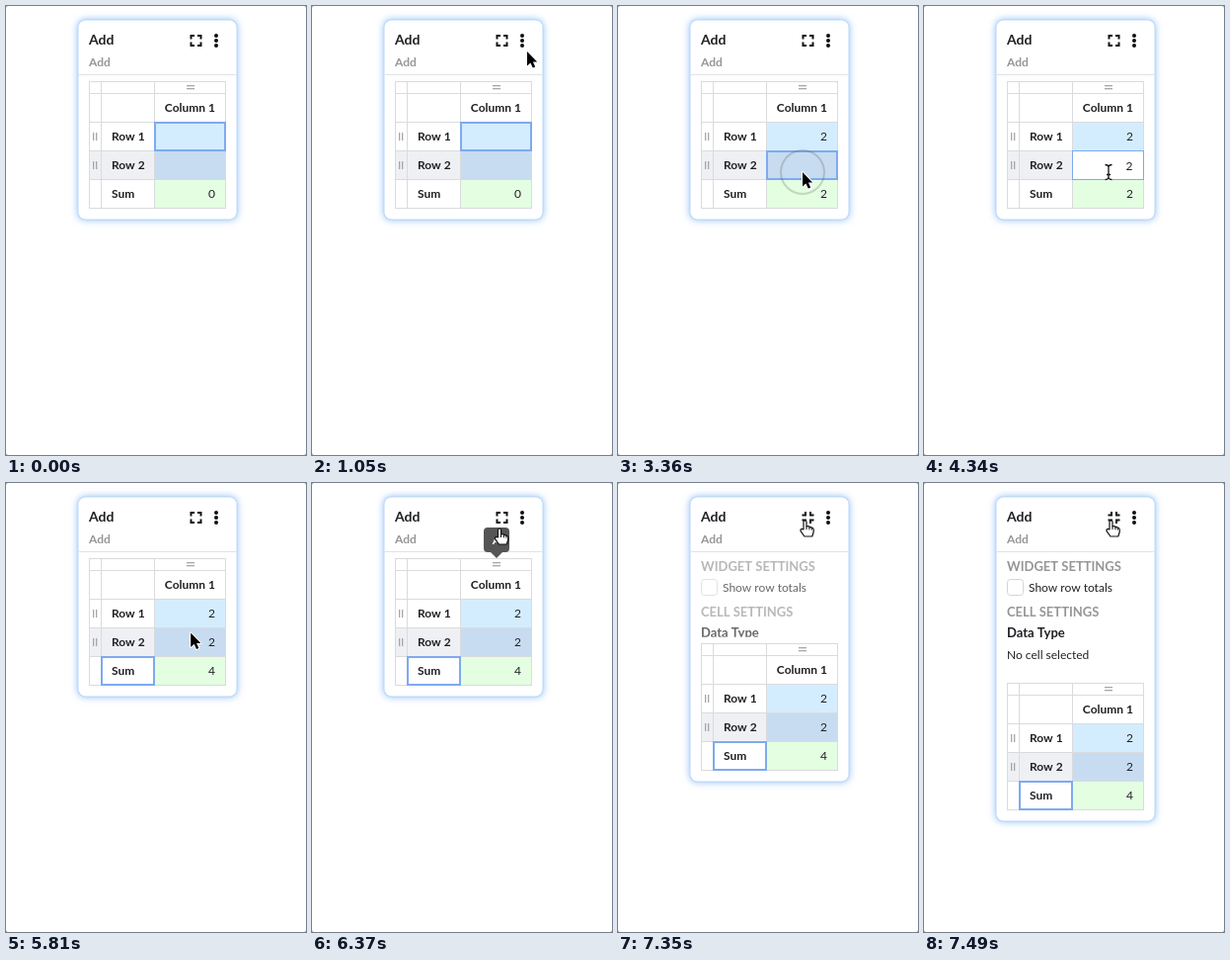
Recreate the animation shown at these times as an HTML page with a canvas. Size 304 by 454 pixels, loop 8000 ms.

```html
<!DOCTYPE html>
<html lang="en">
<head>
<meta charset="utf-8">
<title>Sum table</title>
<style>
  html, body { margin: 0; width: 100%; height: 100%; overflow: hidden; background: #8a8a8a; }
  canvas { display: block; width: 304px; height: 454px; }
</style>
</head>
<body>
<canvas width="304" height="454"></canvas>
<script>
const canvas = document.querySelector('canvas');
const ctx = canvas.getContext('2d');
const LOOP = 8000, TICK = 70;
const BLUE = '#7eaaf0', GRID = '#d9dbdd', INK = '#202124', MUTED = '#969696';

const ratio = window.devicePixelRatio || 1;
canvas.width = 304 * ratio;
canvas.height = 454 * ratio;

const clamp01 = v => Math.min(1, Math.max(0, v));
const progress = (t, from, to) => clamp01((t - from) / (to - from));
const within = (t, from, to) => t >= from && t < to;
const easeInOut = p => p < .5 ? 2 * p * p : 1 - 2 * (1 - p) ** 2;

function rect(x, y, w, h, color) {
  ctx.fillStyle = color;
  ctx.fillRect(x, y, w, h);
}

function frame(x, y, w, h, width, color) {
  ctx.strokeStyle = color;
  ctx.lineWidth = width;
  ctx.strokeRect(x + width / 2, y + width / 2, w - width, h - width);
}

function round(x, y, w, h, r, color) {
  ctx.fillStyle = color;
  ctx.beginPath();
  ctx.roundRect(x, y, w, h, r);
  ctx.fill();
}

function text(str, x, y, { size = 12, weight = 400, color = INK, align = 'left' } = {}) {
  ctx.font = `${weight} ${size}px Lato, sans-serif`;
  ctx.fillStyle = color;
  ctx.textAlign = align;
  ctx.fillText(str, x, y);
}

function drawCard(bottom) {
  ctx.save();
  ctx.shadowColor = 'rgba(110, 170, 245, .75)';
  ctx.shadowBlur = 7 * ratio;
  round(72.5, 13.5, 162, bottom - 13.5, 8, '#b9d8fb');
  ctx.restore();
  round(73.5, 14.5, 160, bottom - 15.5, 7, '#fff');
}

function drawHeader(expanded) {
  text('Add', 84, 39, { size: 14, weight: 700 });
  text('Add', 84, 61, { weight: 700, color: MUTED });
  rect(73.5, 69, 160, 1, '#dfe4ea');
  for (const y of [30, 35, 40]) round(211, y - 2, 4, 4, 2, '#111');

  // Four corner brackets, turned inwards when the card is expanded
  ctx.strokeStyle = '#111';
  ctx.lineWidth = 2;
  ctx.beginPath();
  for (const sx of [-1, 1]) for (const sy of [-1, 1]) {
    const corner = expanded ? 2.5 : 5, end = expanded ? 6 : 1.5;
    ctx.moveTo(192.5 + sx * corner, 35 + sy * end);
    ctx.lineTo(192.5 + sx * corner, 35 + sy * corner);
    ctx.lineTo(192.5 + sx * end, 35 + sy * corner);
  }
  ctx.stroke();
}

function drawSettings(p) {
  ctx.save();
  ctx.beginPath();
  ctx.rect(74, 70, 159, 126 * p);
  ctx.clip();
  ctx.globalAlpha = p;
  const heading = { size: 13, weight: 700, color: MUTED };
  text('WIDGET SETTINGS', 84, 89, heading);
  ctx.strokeStyle = '#d2d4d6';
  ctx.lineWidth = 1;
  ctx.beginPath();
  ctx.roundRect(84.5, 97.5, 16, 16, 3);
  ctx.stroke();
  text('Show row totals', 106, 110);
  text('CELL SETTINGS', 84, 135, heading);
  text('Data Type', 84, 156, { size: 13, weight: 700 });
  text('No cell selected', 84, 178);
  ctx.restore();
}

function drawEditor(y, typedAt, t) {
  rect(151, y, 71, 29, '#fff');
  frame(150, y - 1, 73, 30, 1, BLUE);
  text('2', 211.5, y + 19, { align: 'right' });
  if (t < typedAt + 490) rect(211, y + 7, 1, 15, '#111');
}

function drawTable(t) {
  const right = { align: 'right' }, bold = { weight: 700 };
  rect(84, 146, 66, 29, '#eff0f4');
  rect(150, 117, 72, 29, '#d4edfe');
  rect(150, 146, 72, 29, '#c7dcf0');
  rect(150, 175, 72, 29, '#e4fee2');
  for (const x of [84, 96, 150, 222]) rect(x, 76, 1, 129, GRID);
  for (const y of [76, 88, 117, 146, 175, 204]) rect(84, y, 139, 1, GRID);
  rect(150, 118, 72, 86, 'rgba(255, 255, 255, 0)');

  for (const y of [80, 83]) rect(183, y, 8, 1.3, '#a5a7a9');
  for (const y of [128, 157]) for (const x of [88, 91]) rect(x, y, 1.3, 8, '#a5a7a9');

  text('Column 1', 212, 107, { ...bold, ...right });
  ['Row 1', 'Row 2', 'Sum'].forEach((label, i) => text(label, 107, 136 + 29 * i, bold));

  if (t >= 3290) text('2', 212, 136, right);
  if (t >= 4620) text('2', 212, 165, right);
  text(t < 3360 ? '0' : t < 4690 ? '2' : '4', 212, 194, right);

  if (t < 2660) frame(150, 117, 73, 30, 2, BLUE);
  else if (t < 3290) drawEditor(118, 2660, t);
  else if (t < 3850) frame(150, 146, 73, 30, 2, BLUE);
  else if (t < 4620) drawEditor(147, 3850, t);
  else frame(96, 175, 55, 30, 2, BLUE);
}

function drawTooltip(t) {
  ctx.save();
  ctx.globalAlpha = progress(t, 6090, 6300) * (1 - progress(t, 6510, 6720));
  round(174, 45, 26, 25, 4, '#555');
  ctx.beginPath();
  ctx.moveTo(181, 70);
  ctx.lineTo(193, 70);
  ctx.lineTo(187, 76);
  ctx.fill();
  text('A', 187, 62, { weight: 700, color: '#fff', align: 'center' });
  ctx.restore();
}

// [time, x, y] points of the pointer's way
const WAY = [
  [1540, 179, 133], [2660, 180, 133], [2800, 180, 133], [3150, 187, 168],
  [5740, 187, 168], [6090, 188, 85], [6370, 190, 46], [6650, 189.5, 38], [LOOP, 189.5, 38]
];

function pointerAt(t) {
  if (t < 1540) {
    const p = easeInOut(progress(t, 1050, 1540));
    return [218 - 39 * p, 46 + 87 * p];
  }
  const i = WAY.findIndex(point => t < point[0]);
  const [t0, x0, y0] = WAY[i - 1], [t1, x1, y1] = WAY[i];
  const p = progress(t, t0, t1);
  return [x0 + (x1 - x0) * p, y0 + (y1 - y0) * p];
}

const ARROW = new Path2D('M0 0V14.5L3.4 11.4L5.8 16.6L8.2 15.5L5.9 10.5H10.2Z');
const HAND = new Path2D('M-1.5 9V1.3Q-1.4 0 0 0T1.5 1.3V6Q3.8 5 4.4 6.6Q6 5.8 6.8 7.4Q8.5 7 8.7 9V11.5L7.3 16H-.6L-4.4 10.6Q-5 8.8-3.2 8.4Z');
const FINGERS = new Path2D('M1.5 6V9M4.4 6.6V9.3M6.8 7.4V9.6');
const BEAM = new Path2D('M-3.5-7.5Q0-7.5 0-5V5Q0 7.5 3.5 7.5M3.5-7.5Q0-7.5 0-5V5Q0 7.5-3.5 7.5M-2 2.5H2');

function drawPointer(t) {
  if (t < 1050) return;
  const [x, y] = pointerAt(t);
  const editing = within(t, 2660, 3290) && y < 146 || within(t, 3850, 4620);
  const outline = (path, width, color) => {
    ctx.lineWidth = width;
    ctx.strokeStyle = color;
    ctx.stroke(path);
  };
  ctx.save();
  ctx.translate(x, y);
  ctx.lineJoin = 'round';
  if (editing) {
    outline(BEAM, 3, '#fff');
    outline(BEAM, 1.3, '#111');
  } else if (t > 5740 && y < 88) {
    ctx.fillStyle = '#fff';
    ctx.fill(HAND);
    outline(HAND, 1.2, '#111');
    outline(FINGERS, 1, '#111');
  } else {
    outline(ARROW, 2, '#fff');
    ctx.fillStyle = '#000';
    ctx.fill(ARROW);
  }
  ctx.restore();
}

function drawClick(t) {
  const clicks = [[1680, 1820, 179.5, 133, 22], [3290, 3430, 187, 168, 22], [7000, 7140, 189, 38, 31]];
  for (const [from, to, x, y, r] of clicks) {
    if (!within(t, from, to)) continue;
    ctx.strokeStyle = 'rgba(90, 90, 90, .25)';
    ctx.lineWidth = 2;
    ctx.beginPath();
    ctx.arc(x, y, r, 0, 2 * Math.PI);
    ctx.stroke();
  }
}

function draw(now) {
  const t = Math.floor(now % LOOP / TICK) * TICK;
  const open = easeInOut(progress(t, 7140, 7490));
  const shift = Math.round(126 * open);
  ctx.setTransform(ratio, 0, 0, ratio, 0, 0);
  rect(0, 0, 304, 454, '#8a8a8a');
  round(0, 0, 304, 454, 2, '#fff');
  drawCard(216.5 + shift);
  drawHeader(t >= 7140);
  drawSettings(open);
  ctx.save();
  ctx.translate(0, shift);
  drawTable(t);
  ctx.restore();
  drawTooltip(t);
  drawClick(t);
  drawPointer(t);
  requestAnimationFrame(draw);
}

let start;
requestAnimationFrame(function first(now) {
  start = now;
  draw(0);
});
</script>
</body>
</html>
```
